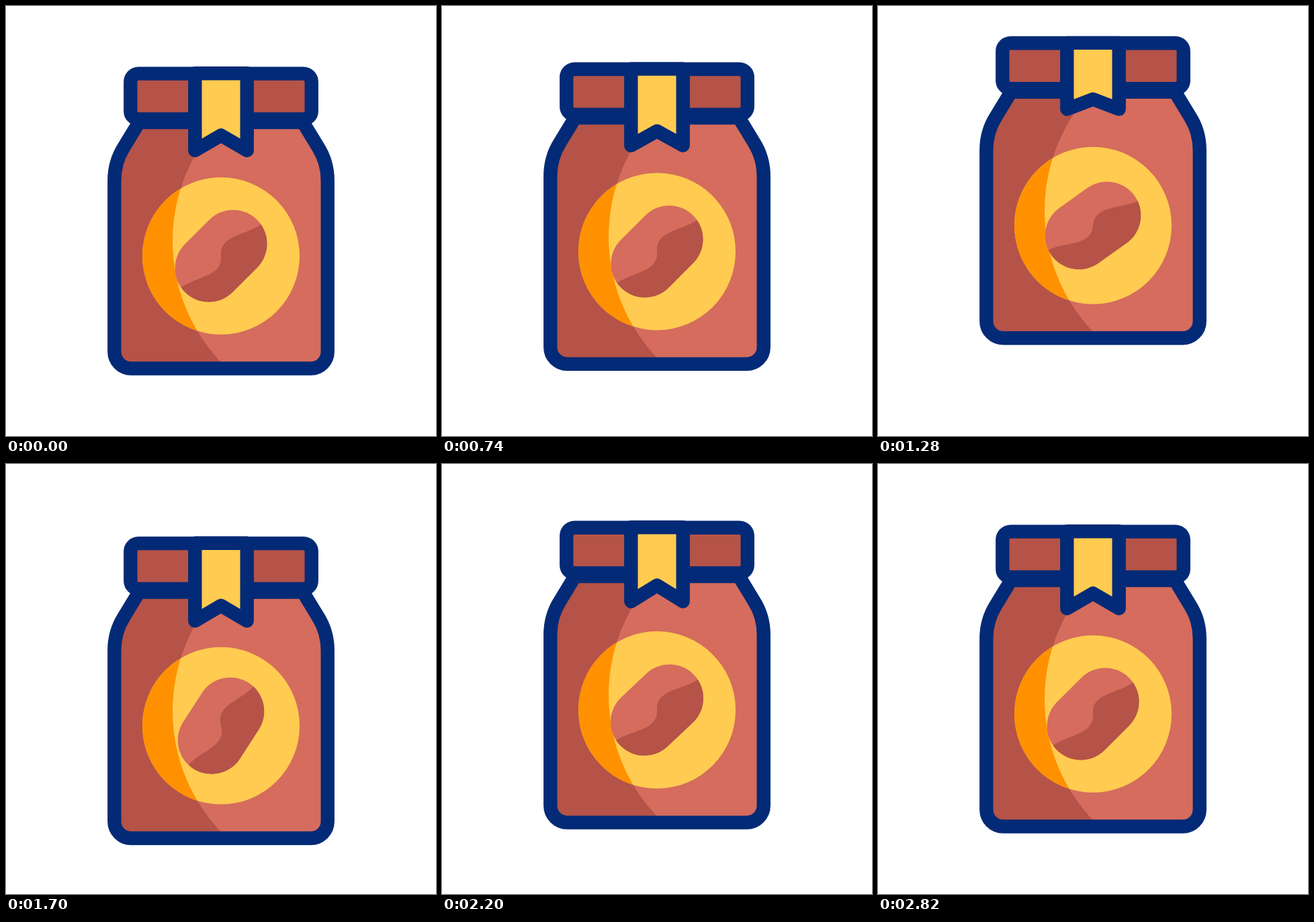
Recreate the animation shown at these times as an HTML page with a canvas. Size 640 px wide and 640 px high, loop 3 s.

```html
<!DOCTYPE html>
<html lang="en">
<head>
<meta charset="utf-8">
<title>Bouncing coffee bag</title>
<style>
  html, body { margin: 0; width: 100%; height: 100%; overflow: hidden; background: #fff; }
  canvas { display: block; width: 640px; height: 640px; }
</style>
</head>
<body>
<canvas id="stage" width="640" height="640"></canvas>
<script>
const ctx = document.getElementById('stage').getContext('2d');
const LOOP = 3000;
const NAVY = '#032a76', LIGHT = '#d56c5d', DARK = '#b55348', YELLOW = '#ffcb50', ORANGE = '#ff9100';
const LINE = 20.4;
const CX = 320, CY = 372;

// Each key: time in ms, value, optional bezier handles for the move that reaches it.
const HANG = [0.1, 0.066];
const lift = [[200, 0], [522, 46.7], [1510, -47.5, HANG], [1765, 29.7], [2047, -27.7], [2360, 17], [2825, 0]];
const turn = [[200, 0], [420, 14.3], [1450, -9.8, [0.2, 0.165]], [1725, 12.6], [2040, -9.5], [2345, 5], [2825, 0]];
const tail = [[220, 0], [550, 16.5], [1540, -17.3, HANG], [1795, 9], [2080, -10], [2390, 6], [2825, 0]];
const notch = [[220, 0], [550, 10], [1540, -9, HANG], [1795, 5], [2080, -11], [2390, 4], [2825, 0]];

const smooth = s => s * s * (3 - 2 * s);

function ease(x, [a, b] = [1 / 3, 2 / 3]) {
  let lo = 0, hi = 1;
  for (let i = 0; i < 24; i++) {
    const s = (lo + hi) / 2, r = 1 - s;
    if (3 * a * s * r * r + 3 * b * s * s * r + s * s * s < x) lo = s; else hi = s;
  }
  return smooth(lo);
}

function valueAt(keys, t) {
  if (t <= keys[0][0]) return keys[0][1];
  for (let i = 1; i < keys.length; i++) {
    const [t0, v0] = keys[i - 1], [t1, v1, handles] = keys[i];
    if (t < t1) return v0 + (v1 - v0) * ease((t - t0) / (t1 - t0), handles);
  }
  return keys[keys.length - 1][1];
}

const body = new Path2D(`M198 173 L175.5 210 C166 225 161.3 242 161.3 260
  V514.5 A25 25 0 0 0 186.3 539.5 H453.7 A25 25 0 0 0 478.7 514.5
  V260 C478.7 242 474 225 464.5 210 L442 173 Z`);

const label = new Path2D();
label.arc(CX, CY, 117, 0, Math.PI * 2);

// Everything outside a large circle is in shade.
const shade = new Path2D();
shade.rect(100, 60, 440, 520);
shade.arc(509.5, 350, 261.5, 0, Math.PI * 2);

const lid = new Path2D();
lid.roundRect(185.3, 100.6, 269.4, 67.8, 12);

const R = 50.3, HALF = 25.7;
const bean = new Path2D();
bean.arc(HALF, 0, R, -Math.PI / 2, Math.PI / 2);
bean.arc(-HALF, 0, R, Math.PI / 2, Math.PI * 1.5);
bean.closePath();

const beanShade = new Path2D('M-82 -11 L-76 -9 C-48 -5 -20 24 0 0 C20 -24 48 5 76 9 L82 11 V70 H-82 Z');

function shaded(shape, base, dark) {
  ctx.save();
  ctx.clip(shape);
  ctx.fillStyle = base;
  ctx.fillRect(100, 60, 440, 520);
  ctx.fillStyle = dark;
  ctx.fill(shade, 'evenodd');
  ctx.restore();
}

function outlined(shape, fill) {
  ctx.fillStyle = fill;
  ctx.fill(shape);
  ctx.stroke(shape);
}

function drawBean(degrees) {
  ctx.save();
  ctx.translate(CX, CY);
  ctx.rotate(-(45 + degrees) * Math.PI / 180);
  ctx.clip(bean);
  ctx.fillStyle = LIGHT;
  ctx.fillRect(-90, -70, 180, 140);
  ctx.fillStyle = DARK;
  ctx.fill(beanShade);
  ctx.restore();
}

function drawRibbon(tailY, notchY) {
  const ribbon = new Path2D(
    `M281.3 100.2 H358.7 V${215 + tailY} L320 ${192.5 + notchY} L281.3 ${215 + tailY} Z`);
  outlined(ribbon, YELLOW);
}

function draw(t) {
  ctx.fillStyle = '#fff';
  ctx.fillRect(0, 0, 640, 640);
  ctx.save();
  ctx.translate(0, valueAt(lift, t));
  ctx.strokeStyle = NAVY;
  ctx.lineWidth = LINE;
  ctx.lineJoin = 'round';
  shaded(body, LIGHT, DARK);
  ctx.stroke(body);
  shaded(label, YELLOW, ORANGE);
  drawBean(valueAt(turn, t));
  outlined(lid, DARK);
  drawRibbon(valueAt(tail, t), valueAt(notch, t));
  ctx.restore();
}

const start = performance.now();
function tick() {
  draw((performance.now() - start) % LOOP);
  requestAnimationFrame(tick);
}
tick();
</script>
</body>
</html>
```
